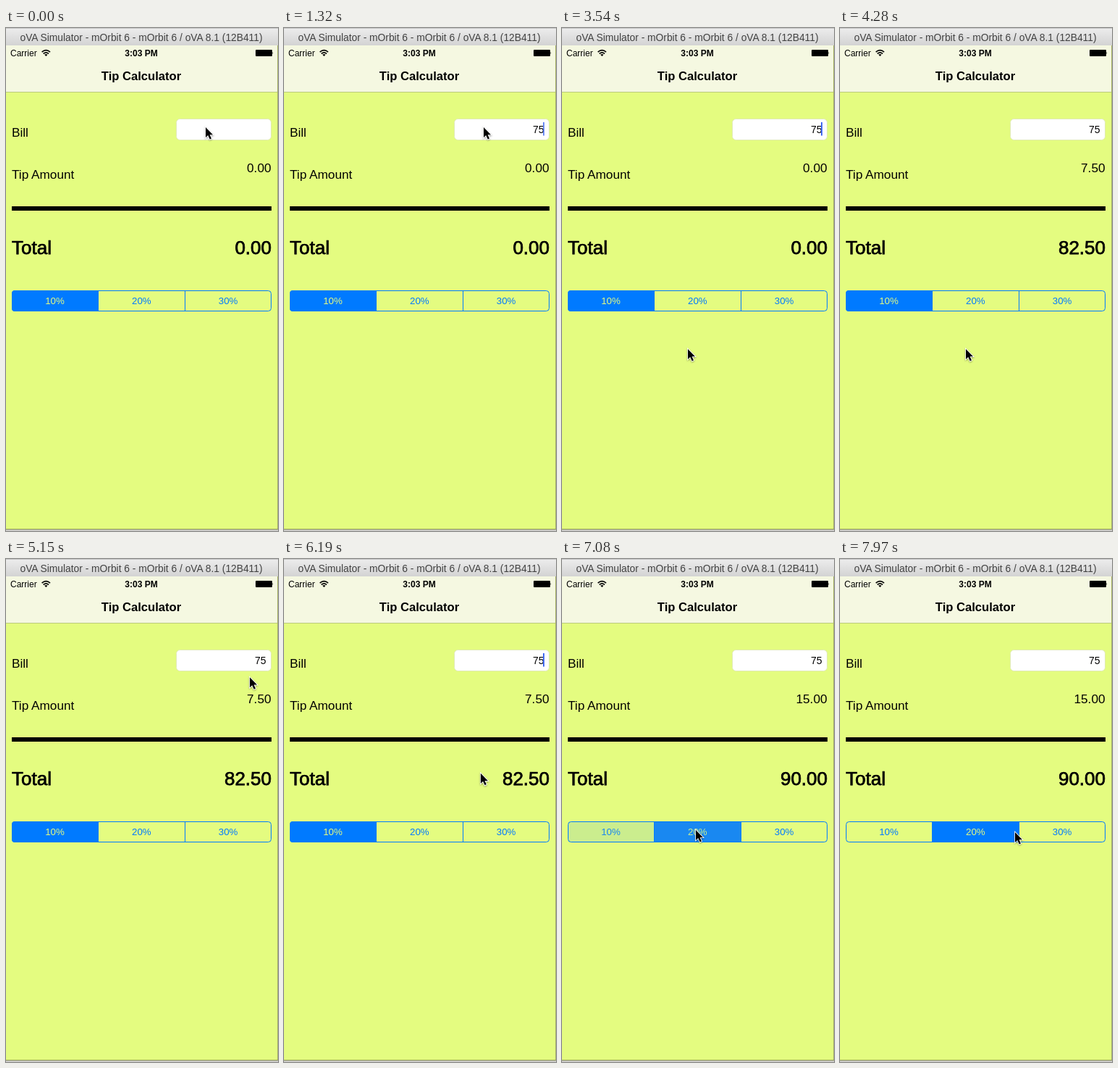
Write an HTML page that moves like this. It is 376 px wide and 694 px high and loops after 8000 ms.

```html
<!DOCTYPE html>
<html lang="en">
<head>
<meta charset="utf-8">
<title>Tip Calculator</title>
<style>
html, body { margin: 0; width: 100%; height: 100%; overflow: hidden; background: #e4fc80; }
svg { display: block; width: 376px; height: 694px; font-family: "Liberation Sans", Arial, sans-serif; }
.label { font-size: 17.2px; }
.total { font-size: 26px; stroke: #000; stroke-width: .75px; }
.end { text-anchor: end; }
.mid { text-anchor: middle; }
.bold { font-weight: bold; }
.tab { font-size: 13.3px; }
.menu { font-size: 14.5px; fill: #fff; }
</style>
</head>
<body>
<svg viewBox="0 0 376 694">
  <defs>
    <linearGradient id="chrome" x2="0" y2="1">
      <stop stop-color="#ededed"/><stop offset="1" stop-color="#d3d3d3"/>
    </linearGradient>
    <clipPath id="tabClip"><rect x="8" y="362" width="359" height="29" rx="4"/></clipPath>
    <filter id="shadow" x="-50%" y="-50%" width="200%" height="200%">
      <feDropShadow dx="0" dy="1" stdDeviation=".9" flood-opacity=".4"/>
    </filter>
  </defs>

  <rect width="376" height="694" fill="#e4fc80"/>
  <rect width="376" height="24" fill="url(#chrome)"/>
  <rect width="376" height="1" fill="#c4c4c4"/>
  <text class="mid" x="187" y="18" font-size="13.8" fill="#424242">oVA Simulator - mOrbit 6 - mOrbit 6 / oVA 8.1 (12B411)</text>

  <rect y="24" width="376" height="64" fill="#f5f8e1"/>
  <rect y="88" width="376" height="1" fill="#bccb7c"/>
  <text x="6" y="38.5" font-size="12">Carrier</text>
  <g fill="none" stroke="#000" stroke-width="1.7">
    <path d="M49.6 33.2Q55.3 28.2 61 33.2M51.7 35.5Q55.3 32.3 58.9 35.5"/>
    <path d="M53.2 36.8Q55.3 35 57.4 36.8L55.3 39Z" fill="#000" stroke="none"/>
  </g>
  <text class="mid bold" x="187" y="38.5" font-size="12">3:03 PM</text>
  <rect x="345" y="30" width="23" height="9" rx="1"/>
  <path d="M368.5 33Q370 34.5 368.5 36Z"/>
  <text class="mid bold" x="187" y="72" font-size="16.6">Tip Calculator</text>

  <text class="label" x="8" y="150">Bill</text>
  <rect x="235.5" y="125.5" width="131" height="29" rx="5" fill="#fff" stroke="#e0eab4"/>
  <text id="bill" class="end" x="359.5" y="145" font-size="14"></text>
  <rect id="caret" x="358" y="130" width="2" height="18.5" fill="#426bf2"/>
  <text class="label" x="8" y="208">Tip Amount</text>
  <text id="tip" class="label end" x="366.5" y="199"></text>
  <rect x="8" y="246" width="359" height="6"/>
  <text class="total" x="8" y="312">Total</text>
  <text id="total" class="total end" x="367" y="312"></text>

  <g id="tabs" clip-path="url(#tabClip)"></g>
  <path d="M127.5 362V391M247.5 362V391" stroke="#007aff"/>
  <rect x="8.5" y="362.5" width="358" height="28" rx="4" fill="none" stroke="#007aff"/>

  <g id="menu">
    <path d="M203 76H357a8 8 0 0 1 8 8V104a8 8 0 0 1-8 8H356.5L347 121.5L337.5 112H203a8 8 0 0 1-8-8V84a8 8 0 0 1 8-8Z" fill-opacity=".88"/>
    <path d="M269.5 76V112" stroke="#63645a"/>
    <text class="menu mid" x="232.5" y="99">Select</text>
    <text class="menu mid" x="317" y="99">Select All</text>
  </g>

  <rect x="375" y="24" width="1" height="668" fill="#a9b568"/>
  <rect y="691" width="376" height="1" fill="#8b9455"/>
  <rect y="692" width="376" height="2" fill="#c9c9c3"/>
  <path id="cursor" d="M0 0V14L3.2 11L5.7 16.4L8 15.4L5.6 10.2H10Z" stroke="#fff" stroke-width="1.6" paint-order="stroke" filter="url(#shadow)"/>
</svg>
<script>
const LOOP = 8000, TICK = 147.5, BLINK = 1032;
const BLUE = [0, 122, 255], LIME = [228, 252, 128];
const FIRST_KEY = 1175, SECOND_KEY = 1315;
const CALCULATE = 3680, REFOCUS = 5100, MENU_OPEN = 6480, PICK_TAB = 6860;

const HOME = [276, 137];
const MOVES = [
  { start: 2507, end: 3392, to: [174, 443] },
  { start: 4277, end: 5162, to: [350, 141] },
  { start: 5605, end: 6645, to: [185, 374], bend: 27 },
  { start: 7375, end: 7957, to: [242, 377] }
];

const $ = id => document.getElementById(id);
const clamp = v => Math.min(1, Math.max(0, v));
const ramp = (t, start, length) => clamp((t - start) / length);
const smooth = k => k * k * (3 - 2 * k);
const mix = (a, b, k) => `rgb(${a.map((v, i) => Math.round(v + (b[i] - v) * k))})`;

// A bend pushes the middle of a move sideways.
function pointerAt(t) {
  let [x, y] = HOME;
  for (const { start, end, to, bend = 0 } of MOVES) {
    const k = smooth(ramp(t, start, end - start));
    const dx = to[0] - x, dy = to[1] - y;
    const side = bend * Math.sin(Math.PI * k) / Math.hypot(dx, dy);
    x += dx * k + dy * side;
    y += dy * k - dx * side;
  }
  return [x, y];
}

// Focusing and typing both restart the blink.
function caretAt(t) {
  const focused = (t > 130 && t < CALCULATE) || (t > REFOCUS && t < PICK_TAB);
  const restart = t < SECOND_KEY ? 130 : t < REFOCUS ? SECOND_KEY : REFOCUS;
  const phase = (t - restart - 815) / BLINK;
  return focused ? clamp(1 - 1.3 * Math.cos(2 * Math.PI * phase)) : 0;
}

$("tabs").innerHTML = ["10%", "20%", "30%"].map((name, i) =>
  `<rect x="${8 + i * 119.7}" y="362" width="120" height="29" fill="#007aff"/>
   <text class="tab mid" x="${67.5 + i * 119.8}" y="381.3">${name}</text>`).join("");
const tabFills = $("tabs").querySelectorAll("rect");
const tabNames = $("tabs").querySelectorAll("text");

function render(ms) {
  const t = Math.floor((ms % LOOP + 8) / TICK) * TICK;
  const rate = t < CALCULATE ? 0 : t < PICK_TAB ? .1 : .2;
  const typed = (t > FIRST_KEY) + (t > SECOND_KEY);
  const picked = 1 - (1 - ramp(t, PICK_TAB, 330)) ** 2;

  $("bill").textContent = "75".slice(0, typed);
  $("tip").textContent = (75 * rate).toFixed(2);
  $("total").textContent = (rate ? 75 * (1 + rate) : 0).toFixed(2);
  $("caret").setAttribute("opacity", caretAt(t));
  $("menu").setAttribute("opacity", t < MENU_OPEN ? 0 : 1 - ramp(t, PICK_TAB, 130));
  [1 - picked, picked, 0].forEach((on, i) => {
    tabFills[i].setAttribute("opacity", on);
    tabNames[i].setAttribute("fill", mix(BLUE, LIME, on));
  });
  $("cursor").setAttribute("transform", `translate(${pointerAt(t)})`);
}

const start = performance.now();
function loop() {
  render(performance.now() - start);
  requestAnimationFrame(loop);
}
loop();
</script>
</body>
</html>
```
